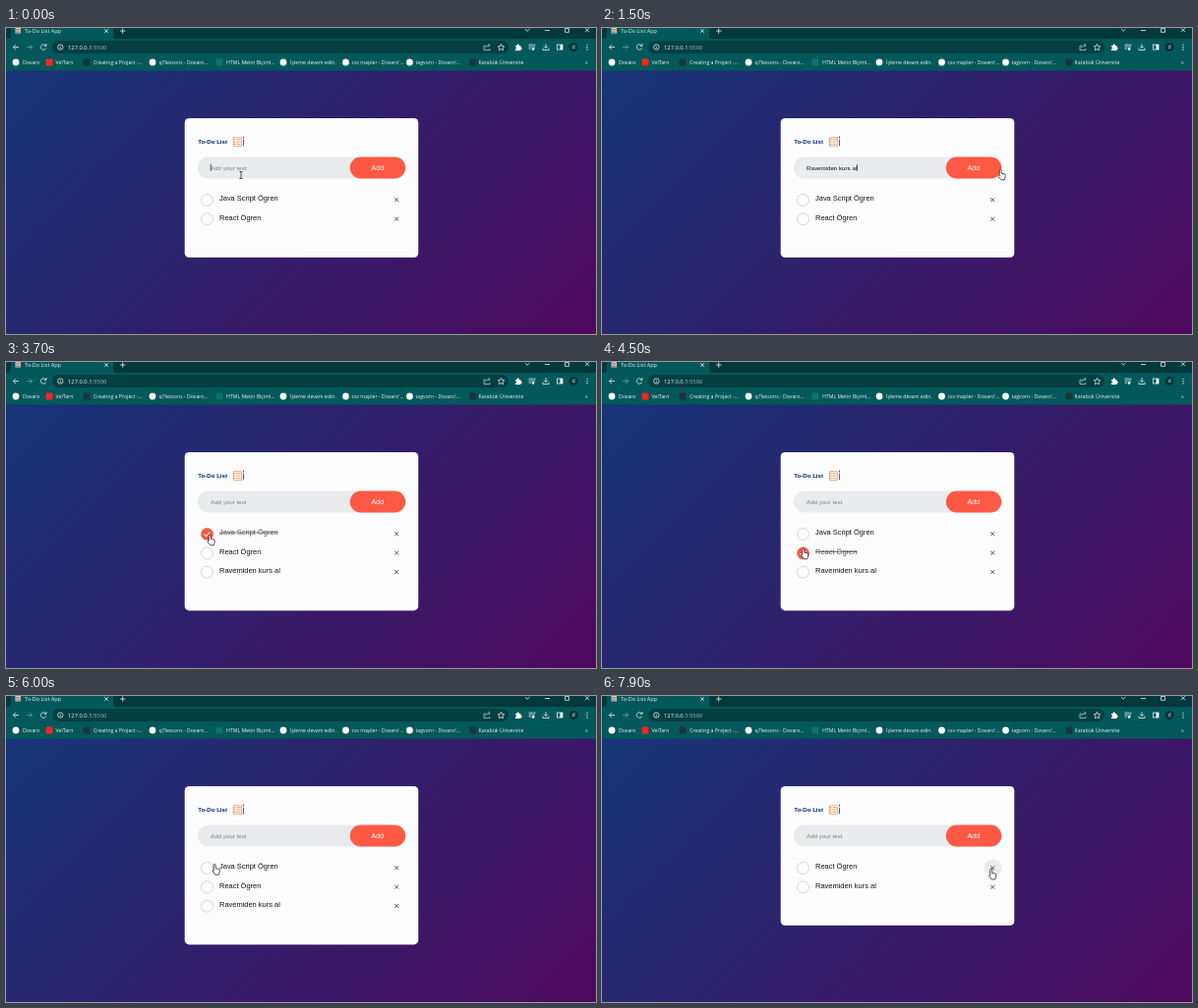
An HTML page for the animation above (8000 ms loop, 600 by 312 pixels).

```html
<!DOCTYPE html>
<html lang="tr">
<head>
<meta charset="utf-8">
<title>To-Do List App</title>
<style>
html, body { margin: 0; width: 100%; height: 100%; overflow: hidden; }
body { background: linear-gradient(135deg, #153677, #4e085f) 0 43px / 600px 269px no-repeat; }
svg { display: block; }
text { font: 5.2px "Open Sans", "Noto Sans", sans-serif; fill: #eef6f6; white-space: pre; }
.tab { font-size: 5.5px; }
.url { font-size: 5.8px; }
.page text { font: 6.2px "Liberation Sans", Arial, sans-serif; fill: #111; }
.page .title { font-weight: bold; font-size: 6.1px; fill: #002765; }
.page .add { font-size: 7.1px; fill: #fff; }
.page .item { font-size: 7.48px; }
.line { fill: none; stroke: #e4f0f0; stroke-width: .8; }
</style>
</head>
<body>
<svg width="600" height="312" viewBox="0 0 600 312">
  <path fill="#02393c" d="M0 0H600V12H0z"/>
  <path fill="#03585b" d="M0 11H3Q5 11 5 8V0H109V8Q109 11 112 11H600V43.5H0z"/>
  <rect x="47" y="13" width="464" height="13" rx="6.5" fill="#033f43"/>

  <!-- tab strip and window buttons -->
  <rect x="9.5" y="0" width="5.5" height="5.5" fill="#d9c9c2"/>
  <path stroke="#8a6a62" stroke-width=".6" d="M10 1.5H14.5M10 3H14.5M10 4.5H14.5"/>
  <text class="tab" x="19" y="5">To-Do List App</text>
  <path class="line" d="M100.2 1.2l3.6 3.6m0-3.6l-3.6 3.6M116 3h5.4m-2.7-2.7v5.4M528 1l2.2 2.2L532.400 1M548 2.500h5M568.500.5h4v3.800h-4zM589 .2l4 4m0-4l-4 4"/>

  <!-- toolbar -->
  <path class="line" d="M13 19.500H7.500m2.500-2.700l-2.700 2.700 2.700 2.700M40.500 18a2.800 2.800 0 1 0 .2 2.500M41 16v2.300h-2.300"/>
  <path class="line" opacity=".45" d="M21 19.500h5.500m-2.500-2.700l2.700 2.700-2.700 2.700"/>
  <circle class="line" cx="55.300" cy="19.500" r="2.700"/>
  <path class="line" d="M55.300 19.200v1.800M55.300 17.800v.6"/>
  <text class="url" x="63" y="21.700">127.0.0.1<tspan fill="#9dbcbd">:5500</tspan></text>
  <path class="line" opacity=".75" d="M488 18h-2v4.500h6V21M487.500 20.500q.5-3 4.500-3m-1.500-1.600l1.700 1.600-1.700 1.600"/>
  <path class="line" d="M503.500 16.300l1 2.200 2.300.3-1.700 1.600.4 2.300-2-1.100-2 1.100.4-2.300-1.700-1.600 2.300-.3z"/>
  <path fill="#fff" d="M518 18h1.500q0-1.700 1.200-1.700t1.200 1.700H523.500v1.700q1.300 0 1.300 1.100t-1.300 1.100v1.100H518v-1.700q1.200-.2 1.200-1T518 19.200z"/>
  <path class="line" d="M531.500 17h4.500M531.500 19h4.500M531.500 21h2.500M537 21.500v-4.500h1.500"/>
  <circle cx="536" cy="21.500" r="1.200" fill="#fff"/>
  <path class="line" d="M549 16v4.500m-2-2l2 2 2-2M546 20.500v2h6v-2"/>
  <rect class="line" x="560.500" y="17" width="5.500" height="5"/>
  <path fill="#fff" d="M563.500 17h2.500v5h-2.500z"/>
  <circle cx="577" cy="19.500" r="4.500" fill="#07343a"/>
  <text x="577" y="21.300" text-anchor="middle">d</text>
  <path stroke="#fff" stroke-width="1.100" d="M591 16.700v1.100m0 1.200v1.100m0 1.200v1.100"/>
  <g id="bookmarks"></g>
  <text x="589" y="37">»</text>

  <g class="page">
    <rect id="card" x="181.700" y="92" width="237.600" rx="4.400" fill="#fdfcff"/>
    <text class="title" x="195.300" y="118.200">To-Do List</text>
    <path fill="#fff0e4" stroke="#f09a5c" stroke-width=".7" d="M231.500 111.500h8v9h-8z"/>
    <path stroke="#e88a50" stroke-width=".7" d="M230.500 113.500h3m1 0h4M230.500 116h3m1 0h4M230.500 118.500h3m1 0h4"/>
    <path stroke="#49618c" stroke-width="1.100" d="M241.500 110.500v2m0 1.200v6.500"/>
    <rect x="195" y="131.500" width="211" height="22" rx="11" fill="#e9ebed"/>
    <rect x="349.800" y="131.500" width="56.400" height="22" rx="11" fill="#ff5945"/>
    <text class="add" x="377.800" y="144.900" text-anchor="middle">Add</text>
    <text id="input" x="208" y="144.600"></text>
    <path id="caret" stroke="#111" stroke-width=".7" d="M0 138.800v7"/>
    <circle id="hover" cx="397.400" cy="175.300" r="8.900" fill="#e9ebed"/>
    <g id="list"></g>
    <g id="cursor" stroke="#222" stroke-width=".8" stroke-linejoin="round" fill="#fff">
      <path id="hand" d="M2.600.5q1.100 0 1.100 1.200V4.800l3 .6q1.300.3 1.100 1.700l-.5 2.600-.6 1.600H3.300L.6 7.900q.1-1.300 1.100-.7V1.500Q1.700.5 2.600.5z"/>
      <path id="arrow" d="M.5.5v9l2.200-2 1.400 3 1.300-.6-1.400-2.900h2.800z"/>
      <path id="beam" fill="none" d="M-1.500-3.500h3M0-3.500v7M-1.500 3.500h3"/>
    </g>
  </g>
</svg>
<script>
const $ = id => document.getElementById(id);
const show = (el, on) => el.setAttribute('display', on ? 'inline' : 'none');
const within = (t, ranges) => ranges.some(([a, b]) => t >= a && t < b);

const LOOP = 8000, ADDED = 1900, REMOVED = 7300, PITCH = 19.4;
const TYPED = 'Ravemiden kurs al';

// icon centre, icon colour, round?, label start, label
$('bookmarks').innerHTML = [
  [10, '#fff', 1, 17, 'Dovaro'],
  [44, '#f22', 0, 50.5, 'VelTarn'],
  [82, '#17363c', 0, 89, 'Creating a Project -...'],
  [149, '#fff', 1, 155.5, 'q7lessons - Dovaro...'],
  [217, '#0b7468', 0, 224, 'HTML Metin Biçiml...'],
  [282, '#fff', 1, 289, 'İşleme devam edin.'],
  [345.5, '#fff', 1, 351.5, "css mapler - Dovaro'..."],
  [410.5, '#fff', 1, 416.5, "tagvorn - Dovaro'..."],
  [475, '#17363c', 0, 480.5, 'Karabük Üniversite']
].map(([x, fill, round, tx, label]) =>
  `<rect x="${x - 3.4}" y="31.600" width="6.800" height="6.800" rx="${round ? 3.4 : .8}" fill="${fill}"/>
   <text x="${tx}" y="37">${label}</text>`).join('');

const items = [
  { label: 'Java Script Ögren', done: [[3000, 3800], [6400, REMOVED]], shown: [[0, REMOVED]] },
  { label: 'React Ögren', done: [[4200, 4800]], shown: [[0, LOOP]] },
  { label: TYPED, done: [[5200, 5800]], shown: [[ADDED, LOOP]] }
];
$('list').innerHTML = items.map(({ label }) => `<g>
  <circle cx="204.500" cy="0" r="6" stroke-width=".7"/>
  <path fill="none" stroke="#fff" stroke-width="1.100" d="M201.800.2l1.900 1.900 3.600-3.900"/>
  <text class="item" x="217" y=".8">${label}</text>
  <path stroke="#444" stroke-width=".9" d="M395.300-2.200l3.900 3.900m0-3.900l-3.900 3.900"/></g>`).join('');
items.forEach((item, i) => item.el = $('list').children[i]);

// time, x, y of the pointer
const path = [
  [0, 239, 150], [1200, 239, 150], [1300, 300, 148], [1400, 372, 145], [1500, 402.500, 143.500],
  [1700, 397, 143], [2200, 397, 143], [2400, 325, 160], [2600, 208.800, 176.300],
  [2700, 205.500, 180], [2800, 205, 176], [3200, 205, 176], [3300, 204.500, 175.500],
  [3700, 204.500, 175.500], [4000, 202, 189.500], [4700, 202, 189.500], [5000, 202, 211],
  [5700, 202, 211], [6000, 209.500, 171], [6200, 204, 174.500], [6500, 204, 174.500],
  [6900, 398, 175], [7300, 398, 175], [7600, 393, 175.700], [LOOP, 393, 175.700]
];
function pointer(t) {
  const i = path.findIndex(k => k[0] > t);
  const [t0, x0, y0] = path[i - 1], [t1, x1, y1] = path[i];
  const p = (t - t0) / (t1 - t0);
  return [x0 + (x1 - x0) * p, y0 + (y1 - y0) * p];
}

function drawInput(t) {
  const typing = t >= 100 && t < ADDED;
  const count = t >= 1100 ? 17 : t >= 1000 ? 16 : Math.min(14, Math.ceil(t / 100 * 1.75));
  const input = $('input');
  input.textContent = typing ? TYPED.slice(0, count) : 'Add your text';
  input.style.fill = typing ? '#111' : '#7d7f84';
  show($('caret'), t < ADDED);
  const x = typing ? 208.300 + input.getComputedTextLength() : 208.300;
  $('caret').setAttribute('transform', `translate(${x})`);
}

function drawList(t) {
  let row = 0;
  for (const { el, done, shown } of items) {
    const on = within(t, shown), checked = within(t, done);
    show(el, on);
    el.setAttribute('transform', `translate(0 ${175.500 + PITCH * row})`);
    if (on) row++;
    const [circle, tick, text] = el.children;
    circle.setAttribute('fill', checked ? '#ff5945' : '#fdfcff');
    circle.setAttribute('stroke', checked ? '#ff5945' : '#c9c7cf');
    show(tick, checked);
    text.style.fill = checked ? '#555' : '#111';
    text.style.textDecoration = checked ? 'line-through' : 'none';
  }
  $('card').setAttribute('height', 142 + PITCH * (row - 2));
}

function drawPointer(t) {
  const [x, y] = pointer(t);
  const overInput = y < 153 && x < 348;
  const overLink = y < 153 ? !overInput : y > 165;
  show($('cursor'), t < 100 || t >= 1300);
  show($('beam'), overInput);
  show($('hand'), overLink);
  show($('arrow'), !overInput && !overLink);
  $('cursor').setAttribute('transform', `translate(${x} ${y})`);
  show($('hover'), x > 386 && y > 165);
}

function draw(now) {
  const t = Math.floor(now % LOOP / 100) * 100;
  drawInput(t);
  drawList(t);
  drawPointer(t);
  requestAnimationFrame(draw);
}
draw(0);
</script>
</body>
</html>
```
